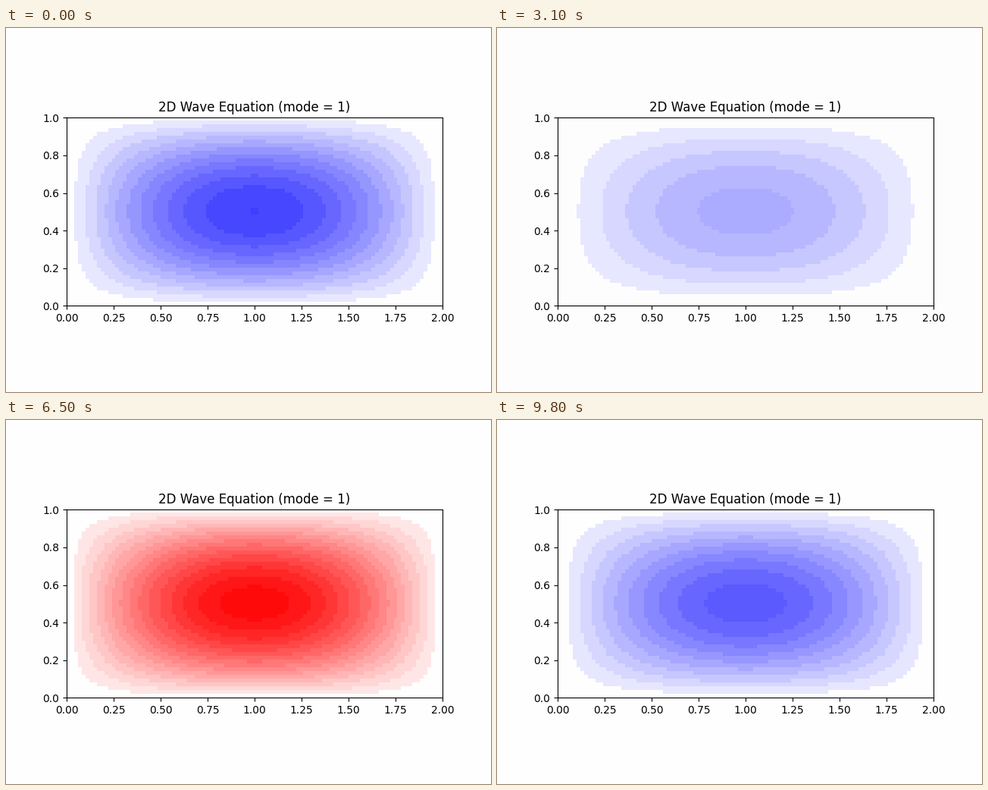
Write a matplotlib script that moves like this. It is 640 by 480 pixels and loops after 9900 ms.

```python
import numpy as np
import matplotlib.pyplot as plt
from matplotlib.animation import FuncAnimation

WIDTH, HEIGHT, DPI = 640, 480, 100
NX, NY = 100, 50
FRAMES, INTERVAL = 99, 100
PERIOD, PEAK = 100, 11.5        # in frames
BAND = 16                       # brightness levels per colour band
PLOT_PIXELS = 496 * 248
MARGIN_PIXELS = WIDTH * HEIGHT - PLOT_PIXELS

plt.rcParams["font.family"] = "DejaVu Sans"


def standing_wave():
    """Lowest mode on the interior nodes of a clamped 2 x 1 membrane."""
    x = np.sin(np.pi * np.arange(1, NX + 1) / (NX + 1))
    y = np.sin(np.pi * np.arange(1, NY + 1) / (NY + 1))
    mode = np.outer(y, x)
    return mode / mode.max()


MODE = standing_wave()


def banded_colours(amplitude):
    """Blue-white-red image in flat bands, plus the shade shared with the page."""
    level = 2 * np.floor(128 * (1 - np.abs(amplitude) * MODE)).astype(int)
    level = np.clip(level, 0, 254)
    band = level // BAND
    shade = np.zeros_like(level)
    for b in np.unique(band):
        inside = band == b
        if b < 15:
            shade[inside] = int(level[inside].mean())

    # The palest band is averaged together with the white page.
    pale = band == 15
    weight = PLOT_PIXELS / MODE.size
    total = MARGIN_PIXELS * 255 + weight * level[pale].sum()
    page_shade = int(total / (MARGIN_PIXELS + weight * pale.sum()) - 0.01)
    shade[pale] = page_shade

    full = np.where(pale, 254, 255)
    if amplitude > 0:
        image = np.dstack([shade, shade, full])
        page = (page_shade, page_shade, 254)
    else:
        image = np.dstack([full, shade, shade])
        page = (254, page_shade, page_shade)
    return image.astype(np.uint8), np.array(page) / 255


fig, ax = plt.subplots(figsize=(WIDTH / DPI, HEIGHT / DPI), dpi=DPI)
picture = ax.imshow(np.full((NY, NX, 3), 255, np.uint8), origin="lower",
                    extent=(0, 2, 0, 1), interpolation="nearest")
ax.set_title("2D Wave Equation (mode = 1)")


def update(frame):
    amplitude = np.cos(2 * np.pi * (frame - PEAK) / PERIOD)
    image, page = banded_colours(amplitude)
    picture.set_data(image)
    fig.set_facecolor(page)
    ax.set_facecolor(page)
    return (picture,)


animation = FuncAnimation(fig, update, frames=FRAMES, interval=INTERVAL,
                          repeat=True, repeat_delay=0, blit=False)
plt.show()
```
